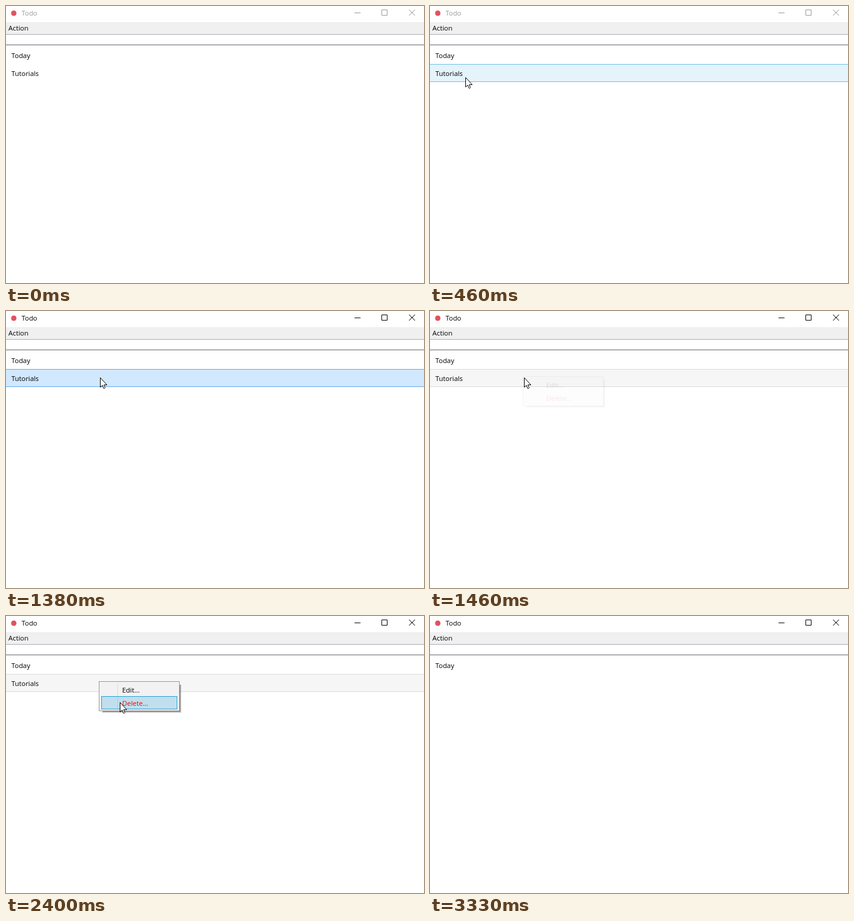
Recreate the animation shown at these times as an HTML page. Size 698 by 463 pixels, loop 4.74 s.

```html
<!DOCTYPE html>
<html lang="en">
<head>
<meta charset="utf-8">
<title>Todo</title>
<style>
  html, body { margin: 0; width: 100%; height: 100%; overflow: hidden; background: #fff; }
  svg { display: block; width: 698px; height: 463px; font: 11.4px "Open Sans", "Noto Sans", sans-serif; }
  #bar { color: #999; }
  #bar.active { color: #000; }
  #bar text { fill: currentColor; }
  #bar path { fill: none; stroke: currentColor; }
  #row { fill: none; stroke: none; }
  #row text { fill: #000; stroke: none; }
  #row.hover { fill: #e5f3fb; stroke: #70c0e7; }
  #row.pressed { fill: #d1e8ff; stroke: #66a7e8; }
  #row.selected { fill: #f6f6f6; stroke: #dadada; }
  #row.gone { display: none; }
</style>
</head>
<body>
<svg viewBox="0 0 698 463">
  <circle cx="13" cy="12" r="4.5" fill="#e2525f"/>
  <g id="bar">
    <text x="26" y="16">Todo</text>
    <path d="M582 11.5h10M627.5 6.5h9v9h-9zM673 6l10 10M683 6l-10 10"/>
  </g>

  <path fill="#f0f0f0" d="M0 27h698v20H0z"/>
  <path fill="#abadb3" d="M0 47h698v1H0zM0 64h698v2H0z"/>
  <text x="4" y="41">Action</text>
  <text x="9" y="87">Today</text>

  <g id="row">
    <rect x="-1" y="97.5" width="700" height="29"/>
    <text x="9" y="117">Tutorials</text>
  </g>

  <g id="menu">
    <g fill-opacity=".22">
      <rect x="162" y="116" width="129" height="44"/>
      <rect x="161" y="115" width="131" height="46"/>
      <rect x="160" y="114" width="133" height="48" fill-opacity=".1"/>
    </g>
    <rect x="155.5" y="109.5" width="134" height="49" fill="#f2f2f2" stroke="#999"/>
    <path d="M186.5 112v44" stroke="#dcdcdc"/>
    <rect id="pick" x="159.5" width="126" height="21" fill="#26a0da" fill-opacity=".24" stroke="#26a0da"/>
    <text x="194" y="128">Edit...</text>
    <text x="194" y="150" fill="#f00">Delete...</text>
  </g>

  <path id="cursor" fill="#fff" stroke="#000" stroke-linejoin="round"
    d="M.5 .5V16.5L4 13.2 6.2 18.5H7.5L8.5 17.5 6.5 12.5H11.5z"/>
</svg>
<script>
const LOOP = 4740;
const STEP = 77.3; // the screen refreshes once per step; all times below are in steps
const LEAD = 12;

const easeIn = u => u ** 1.8;
const easeOut = u => 1 - (1 - u) ** 1.8;
const smooth = u => u * u * (3 - 2 * u);
const clamp = u => Math.min(1, Math.max(0, u));
const get = id => document.getElementById(id);
const show = (el, on) => el.setAttribute("display", on ? "inline" : "none");

const ENTER = 1, OVER_ROW = 6, PRESS = 18, MENU = 19, DISMISS = 32, REMOVED = 34, LEAVE = 43;
const origin = [150, 426];
const moves = [
  { from: ENTER, until: OVER_ROW, to: [59, 119], ease: easeOut },
  { from: OVER_ROW, until: 7, to: [62, 116], ease: smooth },
  { from: 9, until: 13, to: [157, 111], ease: smooth },
  { from: 21, until: 25, to: [185, 132], ease: easeIn },
  { from: 25, until: 27, to: [191, 141], ease: easeOut },
  { from: 28, until: DISMISS, to: [190, 145], ease: smooth },
  { from: 36, until: LEAVE, to: [322, 463], ease: easeIn }
];

function pointerAt(step) {
  return moves.reduce((pos, { from, until, to, ease }) => {
    const u = ease(clamp((step - from) / (until - from)));
    return pos.map((p, i) => p + (to[i] - p) * u);
  }, origin).map(Math.round);
}

function rowState(step) {
  if (step >= REMOVED) return "gone";
  if (step >= MENU) return "selected";
  if (step >= PRESS) return "pressed";
  return step >= OVER_ROW ? "hover" : "";
}

function draw(time) {
  const step = Math.floor((time + LEAD) / STEP);
  const [x, y] = pointerAt(step);

  get("bar").setAttribute("class", step >= PRESS ? "active" : "");
  get("row").setAttribute("class", rowState(step));

  const menuOpen = step >= MENU && step < DISMISS;
  get("menu").setAttribute("opacity", menuOpen ? clamp((step - MENU + .2) / 2) : 0);
  show(get("pick"), menuOpen && y >= 112);
  get("pick").setAttribute("y", y < 134 ? 112.5 : 134.5);

  show(get("cursor"), step >= ENTER && step < LEAVE);
  get("cursor").setAttribute("transform", `translate(${x} ${y})`);
}

const begin = performance.now();
function tick() {
  draw((performance.now() - begin) % LOOP);
  requestAnimationFrame(tick);
}
tick();
</script>
</body>
</html>
```
